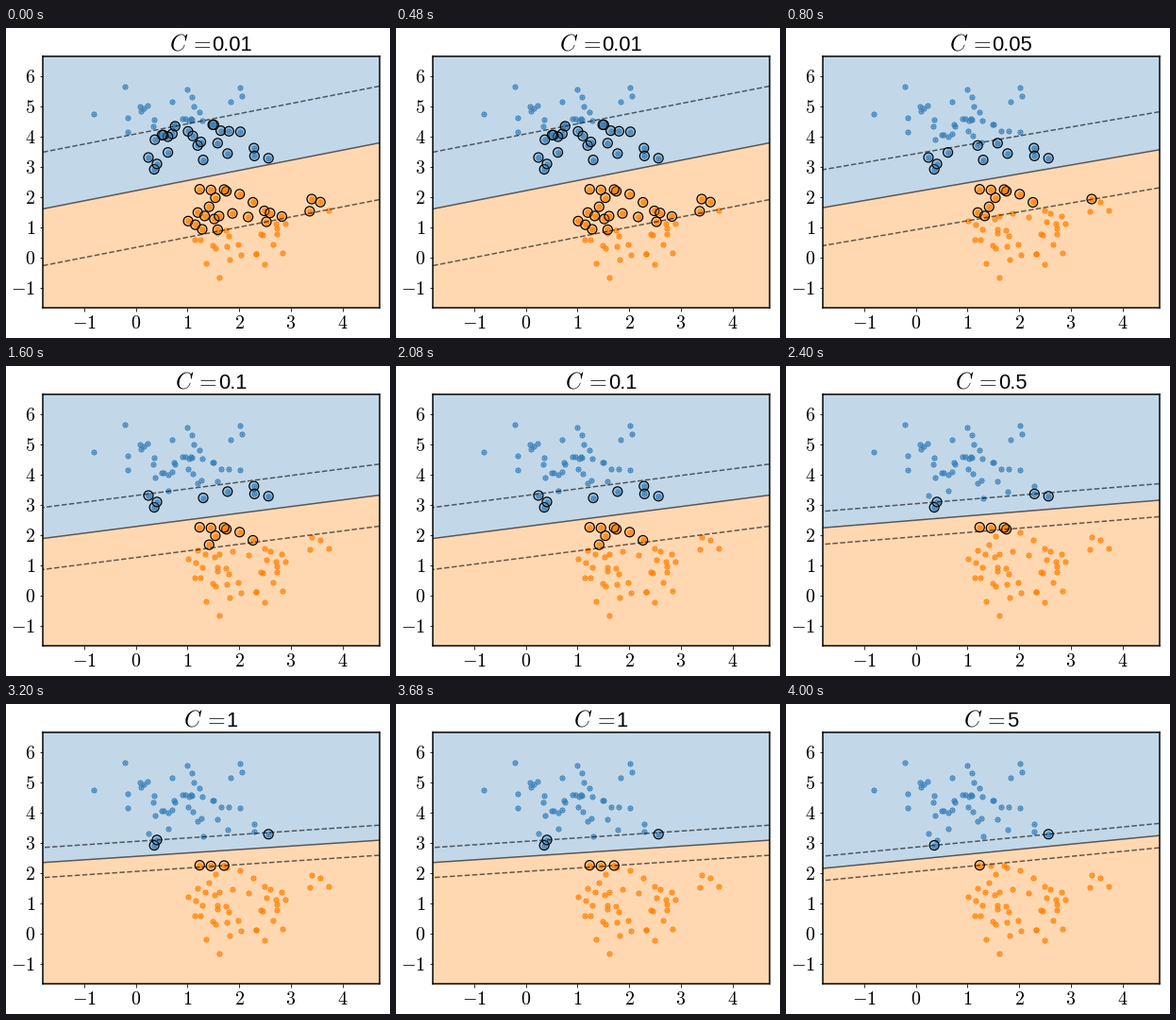
Recreate the animation shown at these times as a matplotlib script. Size 407 px wide and 328 px high, loop 4800 ms.

```python
import numpy as np
import matplotlib.pyplot as plt
from matplotlib.animation import FuncAnimation
from matplotlib.colors import to_rgba

W, H, DPI = 407, 328, 72
BLUE, ORANGE = "#377eb8", "#ff7f00"
COSTS = ["0.01", "0.05", "0.1", "0.5", "1", "5"]

plt.rcParams["mathtext.fontset"] = "cm"

# Two Gaussian clusters, fifty points each
rng = np.random.RandomState(0)
centers = rng.uniform(-10, 10, (2, 2))
X = np.vstack([rng.normal(c, 0.7, (50, 2)) for c in centers])
y = np.repeat([1.0, -1.0], 50)
K = X @ X.T


def fit(cost, tol=1e-4, eps=1e-12):
    """Linear soft-margin SVM by pairwise updates; returns w, b, support mask."""
    a = np.zeros(len(y))
    grad = -np.ones(len(y))
    for _ in range(30000):
        v = -y * grad
        can_grow, can_shrink = a < cost - eps, a > eps
        up = np.where(y > 0, can_grow, can_shrink)
        low = np.where(y > 0, can_shrink, can_grow)
        i = np.argmax(np.where(up, v, -np.inf))
        j = np.argmin(np.where(low, v, np.inf))
        gap = v[i] - v[j]
        if gap < tol:
            break
        step = min(gap / max(K[i, i] + K[j, j] - 2 * K[i, j], eps),
                   cost - a[i] if y[i] > 0 else a[i],
                   a[j] if y[j] > 0 else cost - a[j])
        a[i] += y[i] * step
        a[j] -= y[j] * step
        grad += y * (K[i] - K[j]) * step
    return (a * y) @ X, (v[i] + v[j]) / 2, a > 1e-8


models = [fit(float(c)) for c in COSTS]

# The view ends on the last node of a regular grid
GRID = 0.02
x0, y0 = X.min(axis=0) - 1
x1, y1 = (np.arange(lo, hi, GRID)[-1]
          for lo, hi in zip((x0, y0), X.max(axis=0) + 1))
ends = np.array([x1, x0])

fig = plt.figure(figsize=(W / DPI, H / DPI), dpi=DPI, facecolor="white")
left, top, width, height = 38.5, 29.8, 357.12, 266.11
ax = fig.add_axes([left / W, 1 - (top + height) / H, width / W, height / H])
ax.set_xlim(x0, x1)
ax.set_ylim(y0, y1)
xt, yt = range(-1, 5), range(-1, 7)
ax.set_xticks(xt, [f"${t}$" for t in xt], fontsize=20)
ax.set_yticks(yt, [f"${t}$" for t in yt], fontsize=20)
ax.spines[:].set_linewidth(1.5)

center, baseline = left + width / 2, H - top + 6
symbol = fig.text(0, baseline / H, r"$C\hspace{0.2}=\hspace{-0.2}$",
                  fontsize=24, ha="right", va="baseline")
number = fig.text(0, baseline / H, "", fontsize=22, family="Liberation Sans",
                  ha="left", va="baseline")

corners = np.zeros((4, 2))
upper, = ax.fill(*corners.T, color=BLUE, alpha=0.3, lw=0, zorder=0)
lower, = ax.fill(*corners.T, color=ORANGE, alpha=0.3, lw=0, zorder=0)
for pts, color in ((X[:50], BLUE), (X[50:], ORANGE)):
    ax.scatter(*pts.T, s=25, facecolors=[to_rgba(color, 0.3)],
               edgecolors=[color], lw=1, zorder=1)
    ax.scatter(*pts.T, s=6, color=color, lw=0, zorder=1)
rings = ax.scatter([], [], s=100, edgecolors="k", lw=1.2, zorder=1.5)
tints = np.array([to_rgba(BLUE if s > 0 else ORANGE, 0.3) for s in y])
lines = [ax.plot([], [], style, color="k", alpha=0.6, lw=1.5, zorder=2)[0]
         for style in ("--", "-", "--")]


def band(edge, limit):
    return np.column_stack([[*ends, *ends[::-1]], [*edge, limit, limit]])


def set_title(text):
    number.set_text(text)
    widths = [t.get_window_extent().width for t in (symbol, number)]
    x = center + (widths[0] - widths[1]) / 2
    symbol.set_x(x / W)
    number.set_x((x + 0.5) / W)


def update(n):
    w, b, support = models[n]
    for line, level in zip(lines, (-1, 0, 1)):
        line.set_data(ends, (level - b - w[0] * ends) / w[1])
    edge = lines[1].get_ydata()
    upper.set_xy(band(edge, y1))
    lower.set_xy(band(edge, y0))
    rings.set_offsets(X[support])
    rings.set_facecolors(tints[support])
    set_title(COSTS[n])
    return [upper, lower, rings, symbol, number, *lines]


anim = FuncAnimation(fig, update, frames=len(COSTS), interval=800,
                     init_func=lambda: update(0), repeat=True, repeat_delay=0)
plt.show()
```
